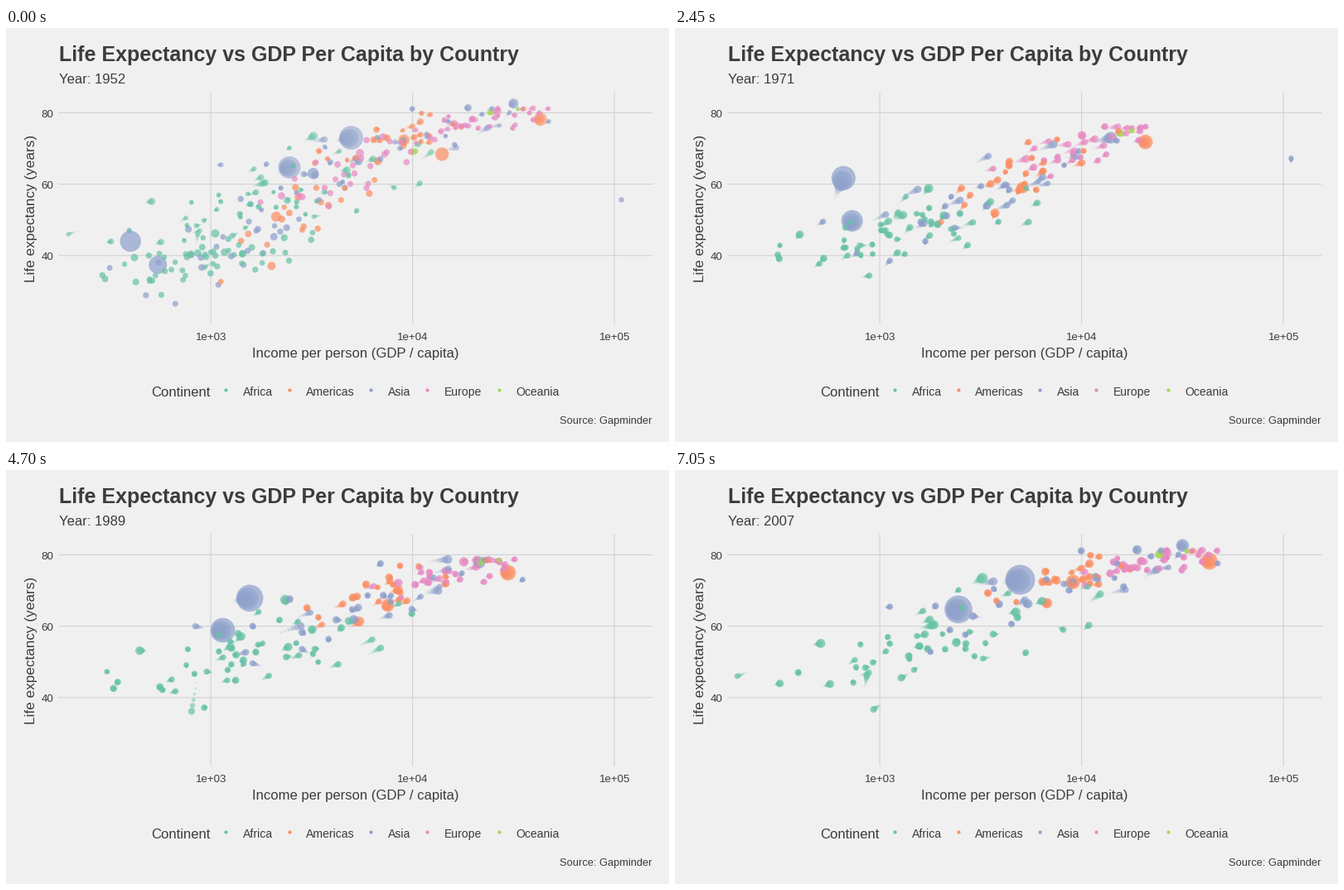
A matplotlib script that plays this animation: 800 px wide and 500 px high, repeating every 10 s.

```python
import numpy as np
import matplotlib.pyplot as plt
from matplotlib.animation import FuncAnimation
from matplotlib.colors import to_rgb

W, H, DPI = 800, 500, 100
FRAMES, INTERVAL = 200, 50
LAST = 140            # frame on which the final year is reached
WAKE, SHOWN = 14, 10  # wake length, and how much of it is big enough to see
INK, PAPER, GRID = "#3C3C3C", "#F0F0F0", "#D2D2D2"
ALPHA = 0.7

plt.rcParams["font.family"] = "Liberation Sans"
rng = np.random.default_rng(7)

COLORS = {
    "Africa": "#66C2A5", "Americas": "#FC8D62", "Asia": "#8DA0CB",
    "Europe": "#E78AC3", "Oceania": "#A6D854",
}

# The few bubbles that stand out: radius range, then year, income, life expectancy.
LEADERS = [
    ("Asia", (12.7, 18), [(1952, 400, 44), (1957, 576, 50.5), (1962, 488, 44.5),
                          (1972, 677, 63.1), (1987, 1379, 67.3), (2007, 4959, 73)]),
    ("Asia", (11, 16.8), [(1952, 547, 37.4), (1982, 856, 56.6), (2007, 2452, 64.7)]),
    ("Americas", (8.2, 10.2), [(1952, 13990, 68.4), (2007, 42952, 78.2)]),
    ("Asia", (6.8, 7.7), [(1952, 3217, 63), (1972, 14779, 73.4), (2007, 31656, 82.6)]),
    ("Americas", (6.1, 8.7), [(1952, 2109, 50.9), (1977, 6660, 61.5),
                              (2007, 9066, 72.4)]),
    ("Asia", (3.2, 3.6), [(1952, 108382, 55.6), (1972, 109348, 67.7),
                          (1982, 31354, 71.3), (2007, 47307, 77.6)]),
    ("Africa", (3.8, 4.2), [(1952, 493, 40), (1987, 848, 44), (1992, 737, 23.6),
                            (2007, 863, 46.2)]),
]

# Everyone else: count, then (first, last) for the mean and spread
# of log income and the mean and spread of life expectancy.
CROWD = {
    "Africa": (51, (2.98, 3.25), (.27, .38), (39, 55.5), (5, 9.5)),
    "Americas": (23, (3.48, 3.95), (.23, .26), (53, 73.6), (8.5, 4)),
    "Asia": (29, (3.17, 3.87), (.33, .48), (45, 70.5), (9, 7.5)),
    "Europe": (30, (3.72, 4.35), (.22, .27), (64.5, 77.7), (6, 2.8)),
    "Oceania": (2, (4.01, 4.46), (.01, .08), (69.2, 80.7), (.15, .6)),
}
LINK = 0.75  # how closely life expectancy follows income

KEYS = 1952 + 5 * np.arange(12)
YEARS = 1952 + 55 * np.arange(LAST + 1) / LAST


def at_years(years, values):
    return np.interp(YEARS, years, values)


def spread(n):
    """Evenly filled bell-shaped scores in random order."""
    p = (np.arange(n) + 0.5) / n
    z = np.clip(np.log(p / (1 - p)) / 1.8, -2, 2)
    return rng.permutation(z)


def soft_cap(v, top):
    return v - 0.85 * np.maximum(0, v - top)


def leader(continent, radii, points):
    year, income, life = np.array(points).T
    return (continent, at_years(year, np.log10(income)), at_years(year, life),
            at_years([1952, 2007], radii))


def crowd(continent):
    n, *ranges = CROWD[continent]
    t = np.linspace(0, 1, 12)
    ease = 1 - (1 - t) ** 1.5
    mean_x, sd_x, mean_y, sd_y = (a + (b - a) * ease for a, b in ranges)
    for z0, drift, other in zip(spread(n), spread(n), spread(n)):
        rank = z0 + (0.45 * drift - 0.12 * z0) * t + rng.normal(0, 0.11, 12)
        health = LINK * rank + np.sqrt(1 - LINK ** 2) * other
        health += rng.normal(0, 0.08, 12)
        x = soft_cap(mean_x + sd_x * rank, 4.1 + 0.52 * t)
        y = soft_cap(mean_y + sd_y * health, 73 + 8 * t)
        swell = 1.2 * np.exp(rng.normal(0, 0.5))
        yield (continent, at_years(KEYS, x), at_years(KEYS, y),
               3 + at_years([1952, 2007], [0.6 * swell, swell]))


countries = [leader(*entry) for entry in LEADERS]
for continent in CROWD:
    countries += crowd(continent)
countries.sort(key=lambda c: -c[3][-1])

names, income, life, radius = zip(*countries)
PX = 247.1 + 243.5 * (np.array(income).T - 3)
PY = 102.4 + 4.31 * (80 - np.array(life).T)
RADIUS = np.array(radius).T


def area(r):
    return (2 * r * 72 / DPI) ** 2


fig = plt.figure(figsize=(W / DPI, H / DPI), dpi=DPI, facecolor=PAPER)
ax = fig.add_axes([0, 0, 1, 1])
ax.set_xlim(0, W)
ax.set_ylim(H, 0)
ax.axis("off")


def label(x, y, text, size=12, **kw):
    return ax.text(x, y, text, size=size, color=INK, **kw)


def rule(xs, ys):
    ax.plot(xs, ys, color=GRID, lw=0.8, snap=False, zorder=1)


for i in range(3):
    y = 102.4 + 86.2 * i
    rule([64, 780], [y, y])
    label(57.5, y + 5.5, str(80 - 20 * i), 9.6, ha="right")
    x = 247.1 + 243.5 * i
    rule([x, x], [78, 357])
    label(x + 0.2, 377, f"1e+0{3 + i}", 9.5, ha="center")

label(63.8, 40, "Life Expectancy vs GDP Per Capita by Country", 18, weight="bold")
year_text = label(64, 67, "Year: 1952")
label(422, 398, "Income per person (GDP / capita)", ha="center")
label(30.7, 218, "Life expectancy (years)", 12.3, rotation=90, ha="center", va="center")
label(175.3, 445, "Continent")
for (name, color), x in zip(COLORS.items(), (265, 341.5, 440, 508, 595)):
    ax.scatter([x], [437], s=area(2.1), color=color, linewidths=0, zorder=2)
    label(x + 20.5, 444, name, 10.1)
label(780, 478, "Source: Gapminder", 9.25, ha="right")

dots = ax.scatter([], [], linewidths=0, zorder=3)

# Oldest wake first, so the current points lie on top.
AGES = np.arange(SHOWN, -1, -1)
FADE = (1 - AGES / WAKE) ** 3
COLOR = np.empty((len(AGES), len(names), 4))
COLOR[:, :, :3] = [to_rgb(COLORS[name]) for name in names]
COLOR[:, :, 3] = ALPHA * FADE[:, None]
COLOR = COLOR.reshape(-1, 4)


def draw(frame):
    k = min(frame, LAST)
    rows = (k - AGES) % (LAST + 1)
    dots.set_offsets(np.column_stack([PX[rows].ravel(), PY[rows].ravel()]))
    dots.set_sizes(area(RADIUS[rows] * FADE[:, None]).ravel())
    dots.set_facecolors(COLOR)
    year_text.set_text(f"Year: {round(YEARS[k])}")
    return dots, year_text


anim = FuncAnimation(fig, draw, frames=FRAMES, interval=INTERVAL,
                     repeat=True, repeat_delay=0, blit=False)
plt.show()
```
